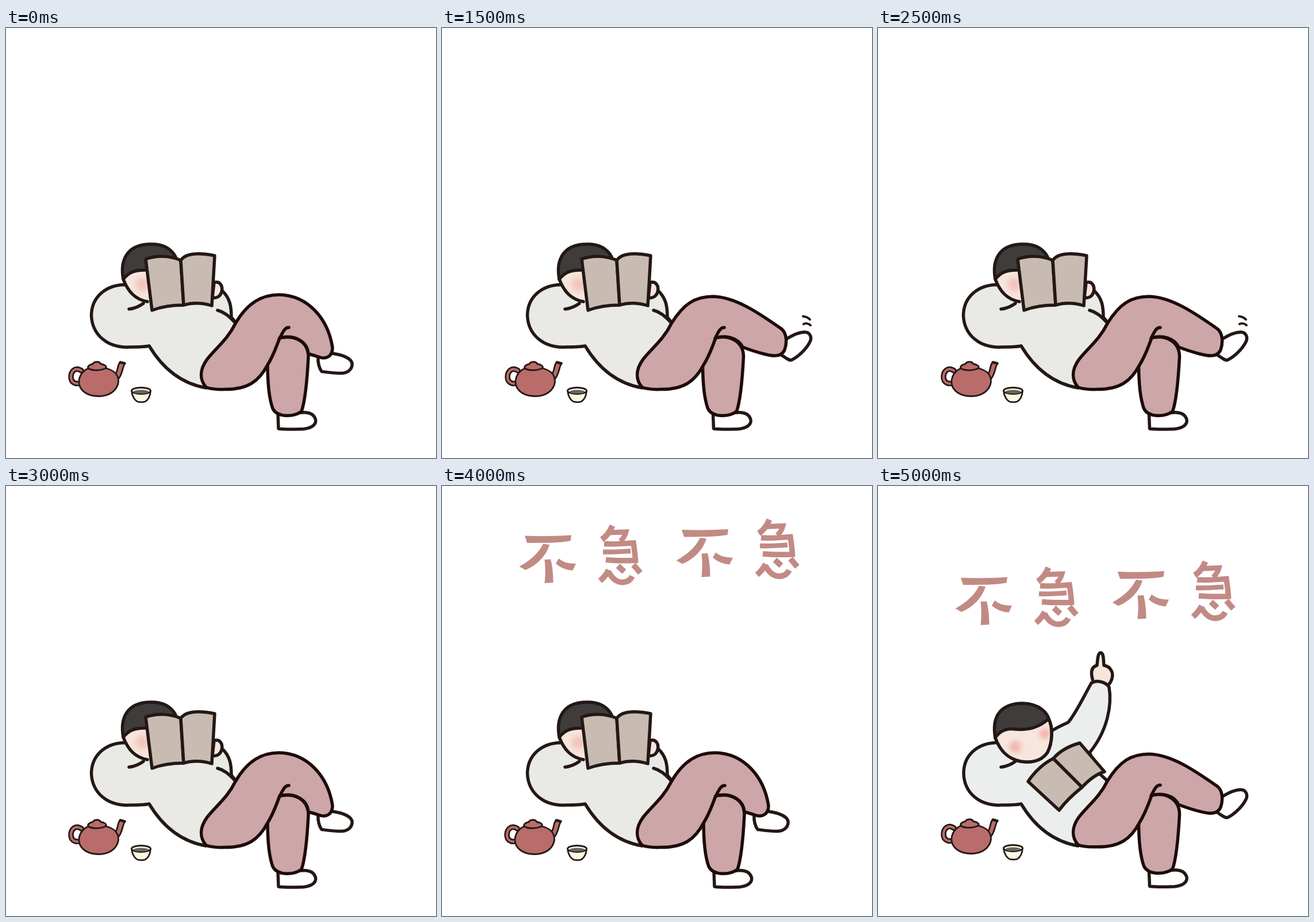
Recreate the animation shown at these times as an HTML page. Size 748 by 748 pixels, loop 8 s.

```html
<!DOCTYPE html>
<html lang="zh">
<head>
<meta charset="utf-8">
<title>不急不急</title>
<style>
  html, body { margin: 0; height: 100%; overflow: hidden; background: #fff; }
  svg { display: block; width: 100vw; height: 100vh; }
  .line { fill: none; stroke: #231815; stroke-width: 5.5; stroke-linecap: round; stroke-linejoin: round; }
  .thin { stroke-width: 2.8; }
  .shirt { fill: #e9e9e6; }
  .resting .shirt { fill: #eceeee; }
  .pants { fill: #cca6a9; stroke: #1d0b09; }
  .white { fill: #fff; }
  .skin { fill: #f7e6dd; }
  .hair { fill: #403c3c; }
  .book { fill: #c8bbb2; }
  .clay { fill: #b96c69; }
  .cup { fill: #fbf7e2; }

  .reading { animation: first 8s step-end infinite; }
  .resting { opacity: 0; animation: last 8s step-end infinite; }
  .down { animation: down 1s step-end infinite; }
  .up { opacity: 0; animation: up 1s step-end infinite; }
  .words { transform: translateY(-300px); animation: drop 8s step-end infinite; }
  @keyframes first { 0% { opacity: 1 } 62.5%, 100% { opacity: 0 } }
  @keyframes last { 0% { opacity: 0 } 62.5%, 100% { opacity: 1 } }
  @keyframes down { 0% { opacity: 1 } 50%, 100% { opacity: 0 } }
  @keyframes up { 0% { opacity: 0 } 50%, 100% { opacity: 1 } }
  @keyframes drop {
    0% { transform: translateY(-300px) }
    43.75% { transform: translateY(-146px) }
    50% { transform: translateY(-73px) }
    56.25%, 100% { transform: none }
  }
</style>
</head>
<body>
<svg viewBox="0 0 748 748" class="line">
  <defs>
    <radialGradient id="blush">
      <stop offset="0" stop-color="#f0b5ae"/>
      <stop offset=".35" stop-color="#f2c3bb"/>
      <stop offset="1" stop-color="#f7e6dd" stop-opacity="0"/>
    </radialGradient>
    <clipPath id="face">
      <path d="M204 438C212 426 223 421 238 423C262 425 280 420 297 405C304 420 304 445 295 463C285 478 268 482 248 479C225 474 212 460 204 438Z"/>
    </clipPath>

    <g id="pot" class="thin">
      <path id="handle" d="M131 596C121 589 113 597 113 607C113 616 120 620 128 618" stroke-width="9.500"/>
      <use href="#handle" stroke="none"/>
      <path d="M131 596C121 589 113 597 113 607C113 616 120 620 128 618" stroke="#b96c69" stroke-width="4.200"/>
      <path class="clay" d="M186 603C196 602 192 589 198.500 581L207 583.500C202 590 203 604 194 612Z"/>
      <path d="M199 581.500L206.500 583.500" stroke-width="4.500"/>
      <path class="clay" d="M143 592C128 599 124 614 129 625C136 637 150 640.500 162 640.500C178 640.500 193 632 195.500 616C196 603 187 595 174 592Z"/>
      <path class="clay" d="M143 592C141 588 147 585 151 584.500C153 580 162 579 165 584.500C170 585 176 588 174 591C168 596 150 597 143 592Z"/>
    </g>
    <g id="cup" class="thin">
      <path class="cup" d="M218.500 631C219 640 224 648 229 650C233 651 238 651 242 650C247 647 251 640 251.500 631"/>
      <ellipse class="cup" cx="235" cy="631" rx="16.500" ry="5.500"/>
      <ellipse cx="235" cy="632.800" rx="13" ry="3.300" fill="#66655f" stroke="none"/>
    </g>
    <g id="shin">
      <path class="white" d="M473 672L474 697C490 699 505 698 518 697.500C533 696 540 689 538.500 681C535 670 524 668 514 669Z"/>
      <path class="pants" d="M455 584C455 610 456 640 464 662C472 678 500 677 514 667C520 650 524 610 526 572C526 545 502 533 476 539Z"/>
    </g>
    <path id="crease" class="pants" style="fill:none" d="M476 540C482 528 485 521 492 521"/>

    <g id="legsUp">
      <use href="#shin" x="-1.500"/>
      <path class="white" d="M599 541C612 533 622 529 631 529C640 529 644 538 640 546C633 560 618 573 608 577.500C603 579 596 572 589 568Z"/>
      <path class="pants" d="M348 625C337 612 336 595 350 576C366 556 386 541 399 514C420 480 440 467 472 467C510 468 550 495 590 523C599 530 601 545 596 560C590 573 575 571 560 567C545 563 533 559 523 555C515 539 495 534 476 539C470 556 462 575 455 586C440 615 420 629 380 628.500C368 629 356 628 348 625Z"/>
      <use href="#crease" x="-1"/>
    </g>

    <g id="phrase" fill="#c28a84" stroke="#c28a84">
      <g stroke="none">
        <path d="M144 159.500C172 161 200 160 225 158.500L223.500 168.500C198 173 172 171.500 148 172Z"/>
        <path d="M176 173.500L187 175C181 195 165 211 145 219L134.500 213C153 203 167 191 176 173.500Z"/>
        <path d="M178.500 201L189 200.500C192 212 193.500 226 193.500 241L178.500 242C180 228 180 214 178.500 201Z"/>
        <path d="M203 199C211 206 221 208 233 208L227.500 220C215 219 206 215 198 208Z"/>
      </g>
      <g fill="none" stroke-width="10" stroke-linecap="butt" stroke-linejoin="miter">
        <path d="M296.500 142C292 153 287 160 278 166"/>
        <path d="M292 154L320 153C318 161 315 165 310 169" stroke-width="9"/>
        <path d="M282 173.500C300 175 318 173 333 172C334.500 183 336 192 336.500 202.500C318 203 302 203 285 201.500" stroke-width="9.500"/>
        <path d="M280 187.500C298 188.500 314 187 328 186" stroke-width="8.500"/>
        <path d="M290 219C286 227 282 232 275 238"/>
        <path d="M289.500 222C297 236 305 241 315 240.500C322 240 328 236 331 230"/>
        <path d="M306 212L317 222"/>
        <path d="M333 210L345 224"/>
      </g>
    </g>
  </defs>

  <g class="reading">
    <path class="shirt" d="M205 446.500C173 448 149 468 148.500 500C150 535 178 557 215 555C230 555 240 555 249 553C270 588 302 618 348 626L400 513L392 503C392 485 390 470 376 457Z"/>
    <path d="M368 491C380 494 390 503 398 512M214 489C223 488 231 485 239 479"/>
    <path class="skin" stroke="none" d="M204 437L243 415L250 477C225 473 212 458 204 437Z"/>
    <circle cx="237" cy="446" r="23" fill="url(#blush)" stroke="none" opacity=".75"/>
    <path class="hair" d="M204 437C199 410 205 376 253 376C275 376 288 385 295 398L243 421C225 421 214 424 204 437Z"/>
    <path d="M204 437C212 458 224 472 246 476"/>
    <path class="skin" d="M362 442.500C372 440 377 448 375.500 457C374 466 367 471 359 469Z"/>
    <path class="book" d="M243 402C262 395 285 396 304 404L309 482C290 482 270 485 254 491Z"/>
    <path class="book" d="M304 404C314 390 338 391 363 396L358 483C342 478 325 477 309 482Z"/>
    <use href="#cup"/>
    <g class="down">
      <use href="#shin"/>
      <path class="white" d="M543 573C542 582 545 592 549 597.500C560 599 573 601 585 600.500C596 600 603 592 602 583C599 573 582 568 567 566Z"/>
      <path class="pants" d="M348 625C337 612 336 595 350 576C366 556 386 541 399 514C420 478 445 464 475 464C525 465 560 505 568 556C568 571 557 577 545 572.500C537 570 531 568 526 567C524 545 502 533 476 539C470 556 462 575 455 586C440 615 420 629 380 628.500C368 629 356 628 348 625Z"/>
      <use href="#crease"/>
      <use href="#pot"/>
    </g>
    <g class="up">
      <use href="#legsUp"/>
      <path d="M628 501.500C633 502 637 504 640 507M629 515C633 513 638 514 641 517" stroke-width="4"/>
      <use href="#pot" x="1"/>
    </g>
  </g>

  <g class="resting">
    <path class="skin" d="M375 342C370 328 369 315 381 312C382 303 382 291 387 290C393 290 392 302 393 312C405 314 410 325 407 335C405 342 402 345 400 347Z"/>
    <path class="shirt" d="M205 446.500C173 448 149 468 149 500C150 535 178 557 215 555C230 555 240 555 249 553C270 588 302 618 348 626L399 513L385 500L368 464C400 425 407 380 402 350C396 340 379 337 371 343C358 366 345 394 331 411C320 416 311 420 302 426Z"/>
    <path d="M214 489C223 488 231 485 239 479"/>
    <path class="hair" d="M204 438C199 410 205 378 253 378C280 379 295 394 298 408C304 420 304 445 295 463C285 478 268 482 248 479C225 474 212 460 204 438Z"/>
    <g clip-path="url(#face)" stroke="none">
      <path class="skin" d="M200 400H310V490H200Z"/>
      <circle cx="239" cy="454" r="20" fill="url(#blush)"/>
      <circle cx="290" cy="431" r="18" fill="url(#blush)"/>
    </g>
    <path d="M204 438C212 426 223 421 238 423C262 425 280 420 297 405C304 420 304 445 295 463C285 478 268 482 248 479C225 474 212 460 204 438Z"/>
    <path class="book" d="M261 514C272 498 287 483 305 474L355 524C340 536 326 549 315 564Z"/>
    <path class="book" d="M305 474C317 460 333 452 351 447L394 497C380 501 366 512 355 524Z"/>
    <use href="#legsUp" y="-.8"/>
    <use href="#pot" x="1" y="-1"/>
    <use href="#cup" y="-1"/>
  </g>

  <g class="words" role="img" aria-label="不急不急">
    <use href="#phrase"/>
    <use href="#phrase" x="273" y="-10.500"/>
  </g>
</svg>
</body>
</html>
```
